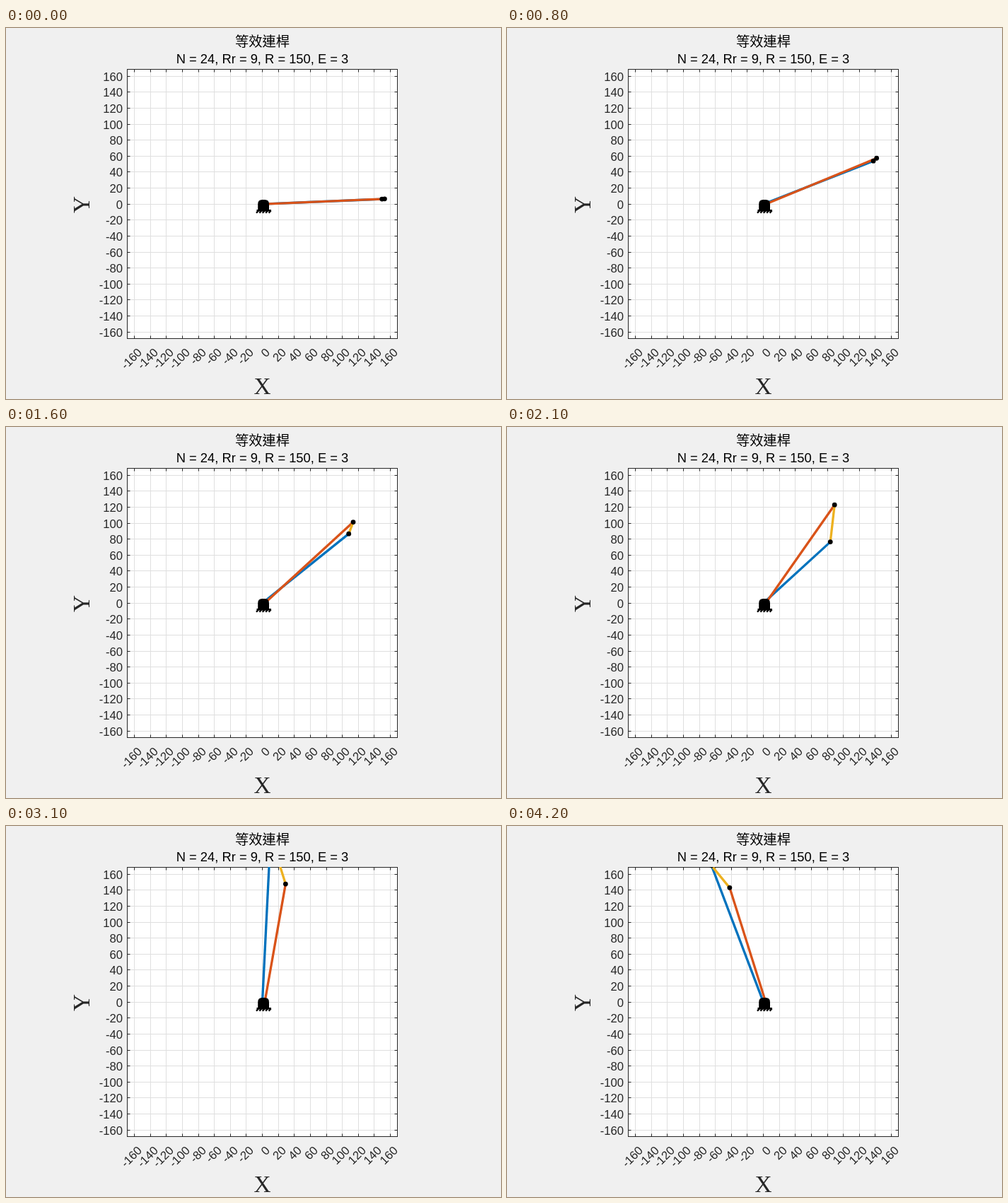
These frames come from a looping animation (700x525 px, 4300 ms). An HTML page:

```html
<!DOCTYPE html>
<html lang="zh-Hant">
<head>
<meta charset="utf-8">
<title>等效連桿</title>
<style>
  html, body { margin: 0; width: 100%; height: 100%; overflow: hidden; background: #f0f0f0; }
  svg { display: block; width: 700px; height: 525px; }
  text { font-family: "Liberation Sans", Arial, sans-serif; fill: #262626; }
  .tick { font-size: 16.67px; text-anchor: end; }
  .title { font-size: 18.33px; text-anchor: middle; fill: #000; }
  .cjk { font-family: "Noto Sans CJK TC", "Noto Sans CJK", sans-serif; font-size: 19.25px; }
  .label { font-family: "Liberation Serif", "Times New Roman", serif; font-size: 33.3px; text-anchor: middle; }
  .link { fill: none; stroke-width: 3.33; }
</style>
</head>
<body>
<svg viewBox="0 0 700 525">
  <defs>
    <clipPath id="plot"><rect x="171" y="58" width="383" height="382"/></clipPath>
  </defs>
  <rect width="700" height="525" fill="#f0f0f0"/>
  <rect x="171" y="58" width="383" height="382" fill="#fff"/>
  <path id="grid" fill="none" stroke="#dfdfdf"/>
  <path id="ticks" fill="none" stroke="#262626"/>
  <rect x="171.5" y="58.5" width="382" height="381" fill="none" stroke="#262626"/>
  <g id="labels"></g>
  <text class="title cjk" x="362.5" y="25.5">等效連桿</text>
  <text class="title" x="362.5" y="50">N = 24, Rr = 9, R = 150, E = 3</text>
  <text class="label" x="362.5" y="518">X</text>
  <text class="label" transform="translate(118 250) rotate(-90)">Y</text>
  <g clip-path="url(#plot)">
    <path id="disc" class="link" stroke="#0072bd"/>
    <path id="ring" class="link" stroke="#d95319"/>
    <path id="coupler" class="link" stroke="#edb120"/>
    <circle id="discPin" r="3.4"/>
    <circle id="ringPin" r="3.4"/>
  </g>
  <path d="M356.2 259V249.3Q356.2 243 362.3 243H366Q372 243 372 249.3V259Z"/>
  <path id="ground" fill="none" stroke="#000" stroke-width="2.4"/>
</svg>
<script>
const $ = id => document.getElementById(id);
const N = 24, R = 150, E = 3;
const SCALE = 362 / 320, CX = 362.5, CY = 249.2;
const STEP = 100, STEPS = 43;
const LEFT = 171.5, RIGHT = 553.5, TOP = 58.5, BOTTOM = 439.5;

const px = ([x, y]) => [CX + x * SCALE, CY - y * SCALE];
const line = (a, b) => `M${px(a)}L${px(b)}`;
const snap = v => Math.floor(v) + 0.5;

function addLabel(value, transform) {
  const t = document.createElementNS("http://www.w3.org/2000/svg", "text");
  t.setAttribute("class", "tick");
  t.setAttribute("transform", transform);
  t.textContent = value;
  $("labels").append(t);
}

function drawAxes() {
  let grid = "", ticks = "";
  for (let v = -160; v <= 160; v += 20) {
    const [rawX, rawY] = px([v, v]);
    const x = snap(rawX), y = snap(rawY);
    grid += `M${x} ${TOP}V${BOTTOM}M${LEFT} ${y}H${RIGHT}`;
    ticks += `M${x} ${TOP}v4M${x} ${BOTTOM}v-4M${LEFT} ${y}h4M${RIGHT} ${y}h-4`;
    addLabel(v, `translate(165 ${y + 6})`);
    addLabel(v, `translate(${x + 7.3} 456) rotate(-45) translate(0 6)`);
  }
  $("grid").setAttribute("d", grid);
  $("ticks").setAttribute("d", ticks);

  let ground = "M354.5 258.3H375";
  for (let x = 357; x < 376; x += 4.4) ground += `M${x} 258.5l-3 3.2`;
  $("ground").setAttribute("d", ground);
}

function place(id, point) {
  const [x, y] = px(point);
  $(id).setAttribute("cx", x);
  $(id).setAttribute("cy", y);
}

// Four-bar equivalent to the roller contact; the pitch point lies at (pitch, 0).
function pose(angle) {
  const c = Math.cos(angle), s = Math.sin(angle);
  const pitch = (N + 1) * E;
  const pin = [E + R * c, R * s];
  const ux = pin[0] - pitch, uy = pin[1];
  // Both cranks meet on the normal to the coupler through the pitch point.
  const a = (pitch - E) * ux / (ux * c + uy * s);
  const jx = E + a * c, jy = a * s;
  const b = pitch * jy / (jx * uy - jy * ux);
  return { pin, center: [pitch + b * ux, b * uy] };
}

function render(time) {
  const step = Math.floor(time / STEP) % STEPS;
  const { pin, center } = pose((step + 1) * 2.5 * Math.PI / 180);
  $("disc").setAttribute("d", line([0, 0], center));
  $("ring").setAttribute("d", line([E, 0], pin));
  $("coupler").setAttribute("d", line(pin, center));
  place("discPin", center);
  place("ringPin", pin);
}

drawAxes();
const start = performance.now();
function tick() {
  render(performance.now() - start);
  requestAnimationFrame(tick);
}
tick();
</script>
</body>
</html>
```
